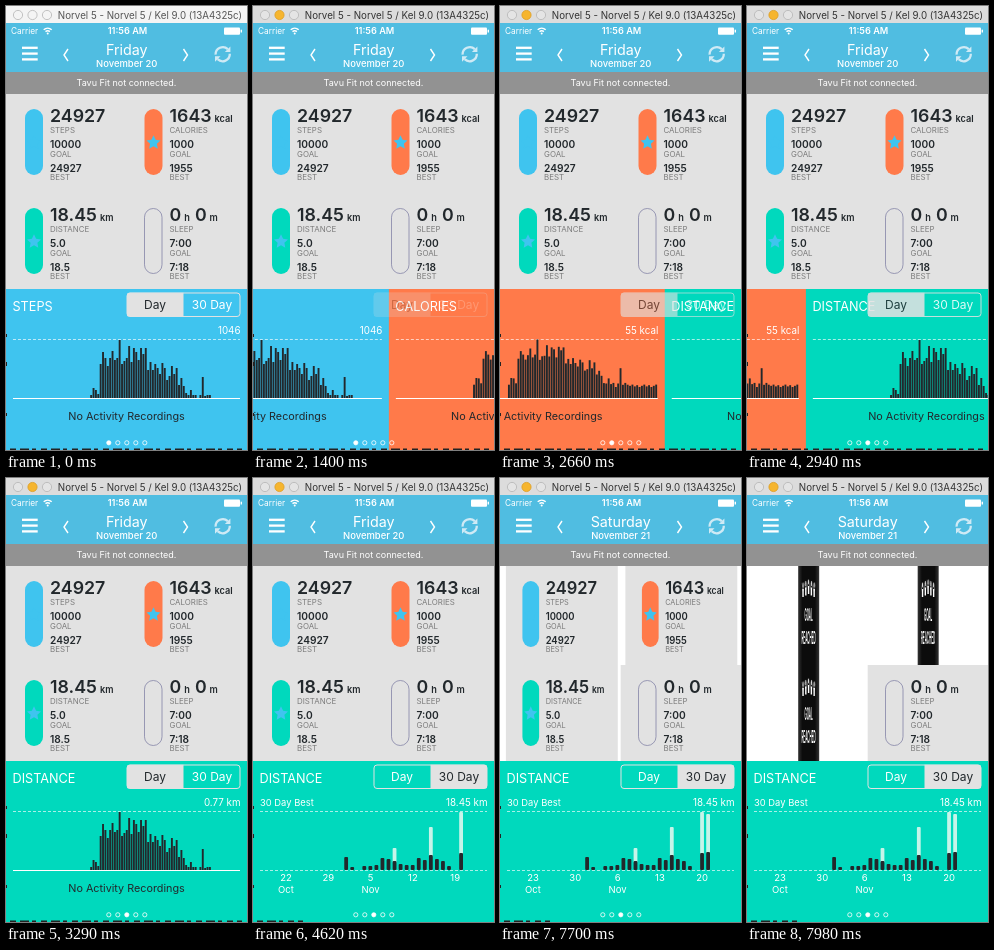
These frames come from a looping animation (241 px wide and 444 px high, 8 s). An HTML page:

```html
<!DOCTYPE html>
<html lang="en">
<head>
<meta charset="utf-8">
<title>Fitness dashboard</title>
<style>
  html, body { margin: 0; width: 100%; height: 100%; overflow: hidden; }
  svg { display: block; width: 100vw; height: 100vh; font-family: Inter, Roboto, sans-serif; }
</style>
</head>
<body>
<svg id="stage" viewBox="0 0 241 444" preserveAspectRatio="none"></svg>
<script>
const W = 241, LOOP = 8000, TICK = 70;
const BLUE = '#3fc4ef', ORANGE = '#ff7a4a', TEAL = '#00d9bd', NAV = '#50bde1', PALE = '#e2e2e2', INK = '#22282c';

// Quarter-hour activity, starting at slot 33 of 96
const ACTIVITY = [3, 10, 8, 4, 34, 46, 40, 32, 40, 47, 38, 40, 58, 34, 37, 40, 52, 36, 50, 46, 38, 50, 44, 50, 28, 36,
  28, 34, 30, 24, 35, 30, 18, 22, 32, 24, 30, 13, 20, 12, 5, 3, 8, 3, 3, 0, 3, 21, 2, 3, 3];
// Calories add a resting rate to every slot until midnight
const BURNED = Array.from({ length: 63 }, (_, i) => 11 + (i * 7 % 5) * .6 + (ACTIVITY[i] || 0) * .78);
// Daily totals from November 1, and the part above goal by day
const DAYS = [13, 3, 0, 4, 4, 5, 12, 11, 9, 6, 5, 5, 12, 10, 15, 11, 9, 4, 0, 17, 18];
const EXTRA = { 9: 13, 15: 28, 20: 41, 21: 38 };
const PANELS = [
  { name: 'STEPS', color: BLUE, max: '1046', data: ACTIVITY },
  { name: 'CALORIES', color: ORANGE, max: '55 kcal', data: BURNED },
  { name: 'DISTANCE', color: TEAL, max: '0.77 km', data: ACTIVITY }
];
const unit = s => `<tspan font-size="9.2" dx="3">${s}</tspan>`;
const CELLS = [
  { x: 0, y: 0, big: '24927', name: 'STEPS', goal: '10000', best: '24927', fill: BLUE },
  { x: 119.5, y: 0, big: '1643' + unit('kcal'), name: 'CALORIES', goal: '1000', best: '1955', fill: ORANGE },
  { x: 0, y: 99, big: '18.45' + unit('km'), name: 'DISTANCE', goal: '5.0', best: '18.5', fill: TEAL },
  { x: 119.5, y: 99, big: `0${unit('h')}<tspan dx="5">0</tspan>${unit('m')}`, name: 'SLEEP', goal: '7:00', best: '7:18' }
];

const rect = (x, y, w, h, fill, more = '') => `<rect x="${x}" y="${y}" width="${w}" height="${h}" fill="${fill}" ${more}/>`;
const circle = (x, y, r, more) => `<circle cx="${x}" cy="${y}" r="${r}" ${more}/>`;
const line = (d, color, width, more = '') => `<path d="${d}" fill="none" stroke="${color}" stroke-width="${width}" ${more}/>`;
const text = (s, x, y, size, fill = '#fff', anchor = 'start', weight = 400) =>
  `<text x="${x}" y="${y}" font-size="${size}" fill="${fill}" text-anchor="${anchor}" font-weight="${weight}">${s}</text>`;
const group = (body, more) => `<g ${more}>${body}</g>`;
const dashed = y => line(`M7 ${y}H234`, '#fff', 1, 'stroke-dasharray="3 2" opacity=".65"');

function star(x, y, r) {
  let pts = '';
  for (let i = 0; i < 10; i++) {
    const a = Math.PI * i / 5, q = i % 2 ? r * .48 : r;
    pts += `${(x + q * Math.sin(a)).toFixed(1)},${(y - q * Math.cos(a)).toFixed(1)} `;
  }
  return `<polygon points="${pts}" fill="${BLUE}"/>`;
}

function titleBar(active) {
  const ring = `fill="${active ? '#e4e4e4' : '#f4f4f4'}" stroke="#b5b5b5" stroke-width=".8"`;
  return rect(0, 0, W, 17, active ? '#dcdcdc' : '#f4f4f4') +
    circle(12, 9, 4.6, ring) +
    circle(26.5, 9, 4.6, active ? 'fill="#f6b52e" stroke="#dc9d24" stroke-width=".8"' : ring) +
    circle(41, 9, 4.6, ring) +
    text('Norvel 5 - Norvel 5 / Kel 9.0 (13A4325c)', 144, 12.6, 9.75, active ? '#333' : '#555', 'middle');
}

function header(day, date, dim) {
  const bars = [41.8, 47.6, 53.4].map(y => line(`M16 ${y}H31.7`, '#fff', 2.3)).join('');
  const wifi = line('M37.7 23.8a6 6 0 0 1 8 0M39.5 25.7a3.5 3.5 0 0 1 4.4 0', '#fff', 1.5) + circle(41.7, 27.4, 1, 'fill="#fff"');
  const battery = rect(218, 21.5, 16, 7.2, '#fff', 'rx="1"') + rect(234.6, 23.7, 1.4, 2.8, '#fff');
  const refresh = line('M209.6 48.6a7.2 7.2 0 0 1 12.2-5.4M223.8 47.8a7.2 7.2 0 0 1-12.2 5.4', '#cfeaf5', 2.3) +
    '<path d="M224.4 40.6v5.5h-5.5zM209 55.8v-5.5h5.5z" fill="#cfeaf5"/>';
  return rect(0, 17, W, 49, NAV) + text('Carrier', 5, 27.8, 8.3) + wifi +
    text('11:56 AM', 121.5, 28, 9.2, '#fff', 'middle', 600) + battery + bars +
    line('M62 43L58 49L62 55', '#fff', 1.4) +
    line('M177.5 43L181.5 49L177.5 55', '#fff', 1.4, `opacity="${dim ? .35 : 1}"`) +
    text(day, 120.7, 49, 14.3, '#fff', 'middle') + text(date, 120.7, 61.4, 9.45, '#fff', 'middle', 500) + refresh +
    rect(0, 66, W, 22, '#929292') + text('Tavu Fit not connected.', 120.5, 80.2, 9, '#fff', 'middle');
}

function cellFront(c) {
  const pill = c.fill ? rect(19, 103, 18, 66, c.fill, 'rx="9"') : rect(19, 103.5, 17.5, 65, 'none', 'rx="8.7" stroke="#8585a8" stroke-width=".8"');
  const row = (value, label, y) => text(value, 44, y, 10.2, INK, 'start', 600) + text(label, 44, y + 8.6, 7.9, '#7c7c7c');
  return rect(1.2, 88, 120.5, 99, PALE) + pill + (c.fill ? star(28, 136.7, 7.4) : '') +
    text(c.big, 44, 115.8, 17.8, INK, 'start', 600) + text(c.name, 44, 126.6, 7.9, '#7c7c7c') +
    row(c.goal, 'GOAL', 142.2) + row(c.best, 'BEST', 165.7);
}

function cellBack() {
  let people = '';
  for (let i = -2; i <= 2; i++) {
    const x = 60 + i * 16, y = 105 + Math.abs(i) * 1.5;
    people += circle(x, y - 1, 2.8, 'fill="#fff"') +
      `<path d="M${x - 7} ${y - 4}L${x - 3} ${y + 3}H${x + 3}L${x + 7} ${y - 4}L${x + 4} ${y + 6}V${y + 11}H${x - 4}V${y + 6}Z" fill="#fff"/>`;
  }
  return rect(0, 88, 121, 99, 'url(#sheen)') + people +
    text('GOAL', 60, 143.5, 17, '#fff', 'middle', 600) + text('REACHED', 60, 166, 17.5, '#fff', 'middle', 600);
}

function cells(angle) {
  let s = rect(0, 82, W, 202, angle ? '#fff' : PALE);
  for (const c of CELLS) {
    const turn = c.fill ? Math.cos(angle * Math.PI / 180) : 1;
    const mid = 60.5 + (turn < 1 ? 1.2 * Math.sin(angle * Math.PI / 180) : 0);
    s += group(turn > 0 ? cellFront(c) : cellBack(),
      `transform="translate(${c.x + mid} ${c.y}) scale(${Math.abs(turn).toFixed(4)} 1) translate(-60.5 0)"`);
  }
  return s;
}

function dayChart(p) {
  const bars = p.data.map((h, i) => rect((84.2 + i * 2.375).toFixed(2), (392 - h).toFixed(1), 1.9, h.toFixed(1), INK)).join('');
  return text(p.max, 234.5, 328.4, 9.8, '#fff', 'end') + dashed(333.5) + bars +
    line('M7 392.5H234', '#fff', 1) + text('No Activity Recordings', 120.5, 414, 10.8, INK, 'middle');
}

function monthChart(last) {
  let s = text('30 Day Best', 7, 328.4, 9.4) + text('18.45 km', 234.5, 328.4, 9.8, '#fff', 'end') + dashed(333.5) + dashed(392.5);
  for (let d = 1; d <= last; d++) {
    const x = (206.2 - (last - d) * 6.05).toFixed(2), h = DAYS[d - 1], extra = EXTRA[d] || 0;
    if (extra) s += rect(x, 392 - h - extra, 3.8, extra + 2, '#c6f4e9', 'rx="1"');
    if (h) s += rect(x, 392 - h, 3.8, h, INK, 'rx="1"');
  }
  for (let i = 0; i < 5; i++) {
    const day = (last + 2 + i * 7) % 31 || 31;
    s += text(day, 33 + i * 42.3, 403.4, 9.5, '#fff', 'middle');
  }
  return s + text('Oct', 33, 415.4, 9.5, '#fff', 'middle') + text('Nov', 117.6, 415.4, 9.5, '#fff', 'middle');
}

function segments(month, opacity) {
  const half = x => rect(x, 286.5, 56.5, 24, PALE);
  return group(group(half(month ? 177.5 : 121), 'clip-path="url(#seg)"') +
    rect(121, 287, 113, 23.5, 'none', `rx="3" stroke="${PALE}"`) +
    text('Day', 149, 303, 12, month ? '#fff' : INK, 'middle') +
    text('30 Day', 206, 303, 12, month ? INK : '#fff', 'middle'), `opacity="${opacity.toFixed(3)}"`);
}

// Fast drag that settles, 12 ticks long
function swipe(t, start) {
  const u = Math.min(1, Math.max(0, (t - start + TICK) / (12 * TICK)));
  return 1 - (1 - u ** 1.265) ** 2;
}

function draw(t) {
  const pos = swipe(t, 1190) + swipe(t, 2520);
  const month = t >= 4620, last = t >= 7350 ? 21 : 20, next = t >= 7560;
  const angle = next ? 100 * (1 - Math.cos(Math.PI / 2 * (t - 7490) / 490)) : 0;

  let s = `<defs><clipPath id="seg"><rect x="120.5" y="286.5" width="114" height="24.5" rx="3.5"/></clipPath>
    <linearGradient id="sheen"><stop stop-color="#333"/><stop offset=".2" stop-color="#0c0c0c"/><stop offset=".8" stop-color="#0c0c0c"/><stop offset="1" stop-color="#333"/></linearGradient></defs>`;
  s += cells(angle);
  PANELS.forEach((p, i) => {
    const x = (i - pos) * W;
    if (Math.abs(x) >= W) return;
    s += group(rect(0, 283, W + .5, 161, p.color) + text(p.name, 6.5, 305, 12.7) + (month ? monthChart(last) : dayChart(p)),
      `transform="translate(${x.toFixed(2)} 0)"`);
  });
  s += segments(t >= 4550, Math.min(1, 3.4 * Math.abs(.5 - pos % 1)));
  for (let i = 0; i < 5; i++)
    s += circle(102.8 + i * 9, 436.8, 2.1, `fill="${i === Math.round(pos) ? '#fff' : 'none'}" stroke="#fff" stroke-width=".8"`);
  // Window edges
  s += line(`M4 443.3H${month ? 50 : 236}`, '#222', 1.4, 'stroke-dasharray="6 4 9 3 4 5"') +
    line('M.5 328v3M.5 356v4M.5 407v3', '#222', 1);
  s += header(next ? 'Saturday' : 'Friday', 'November ' + (next ? 21 : 20), t >= 7210 && t < 7350);
  return s + titleBar(t >= 980);
}

const stage = document.getElementById('stage');
let shown = -1;
function frame() {
  const tick = Math.floor(performance.now() % LOOP / TICK);
  if (tick !== shown) stage.innerHTML = draw((shown = tick) * TICK);
  requestAnimationFrame(frame);
}
frame();
</script>
</body>
</html>
```
